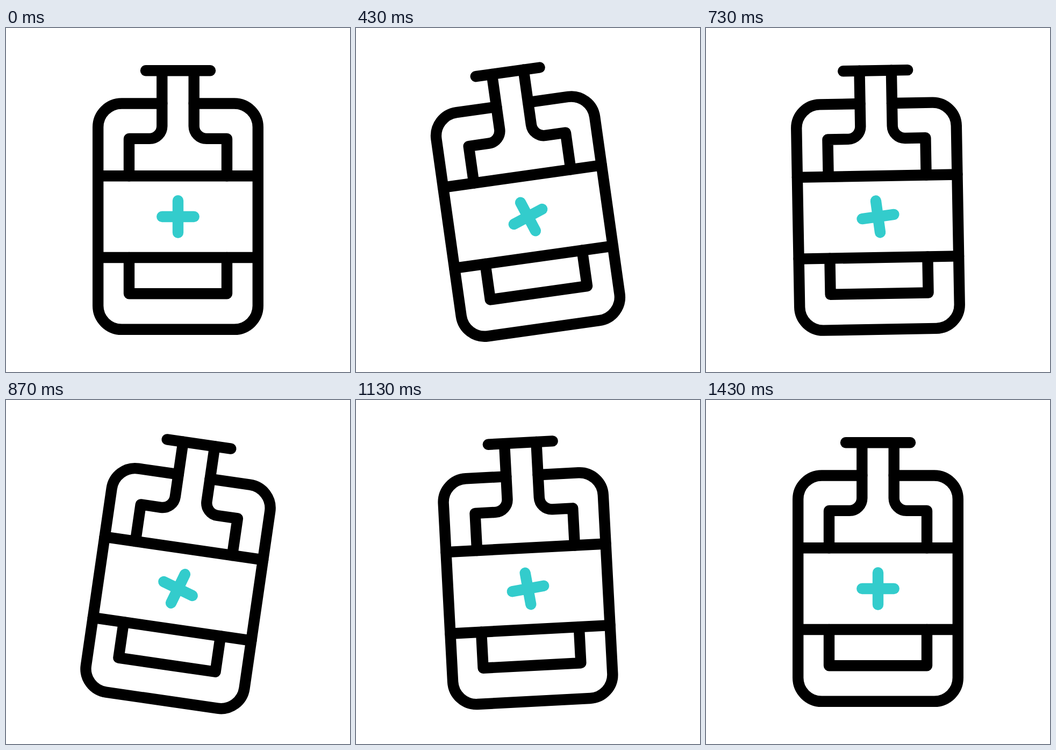
Write an HTML page that moves like this. It is 640 by 640 pixels and loops after 1.67 s.

```html
<!DOCTYPE html>
<html lang="en">
<head>
<meta charset="utf-8">
<title>Medicine bottle</title>
<style>
  html, body { margin: 0; width: 100%; height: 100%; overflow: hidden; background: #fff; }
  svg { display: block; width: 100%; height: 100%; }
  g { fill: none; stroke-width: 20.4; stroke-linecap: round; stroke-linejoin: round; }
</style>
</head>
<body>
<svg viewBox="0 0 640 640">
  <g id="bottle" stroke="#000">
    <path d="M260 79.2H380"/>
    <path d="M290.3 140.5H215.2A44 44 0 0 0 171.2 184.5V516.8A44 44 0 0 0 215.2 560.8H424.8A44 44 0 0 0 468.8 516.8V184.5A44 44 0 0 0 424.8 140.5H349.7"/>
    <path d="M290.3 79.2V182.5A23.4 23.4 0 0 1 266.9 205.9H229V275.2"/>
    <path d="M349.7 79.2V182.5A23.4 23.4 0 0 0 373.1 205.9H411V275.2"/>
    <path d="M171.2 275.2H468.8M171.2 427H468.8"/>
    <path d="M229 427V494.2H411V427"/>
    <path id="cross" stroke="#33cccc" d="M290.3 351H349.7M320 321.3V380.7"/>
  </g>
</svg>
<script>
  const LOOP = 1670, FPS = 30;
  const bottle = document.getElementById('bottle');
  const cross = document.getElementById('cross');

  // [step, degrees]: damped swings; the cross turns relative to the bottle
  const bottleKeys = [[8, 0], [18, -16], [25, 8.5], [36, -4], [42.6, 0]];
  const crossKeys = [[8, 0], [18.4, -42.6], [25, 20], [31, -14.7], [37, 0]];

  function swing(keys, step) {
    if (step <= keys[0][0]) return keys[0][1];
    for (let i = 1; i < keys.length; i++) {
      const [a, from] = keys[i - 1], [b, to] = keys[i];
      if (step < b) {
        const p = (step - a) / (b - a);
        return from + (to - from) * (1 - Math.cos(Math.PI * p)) / 2;
      }
    }
    return keys[keys.length - 1][1];
  }

  function turn(el, deg) {
    el.setAttribute('transform', `rotate(${deg.toFixed(3)} 320 351)`);
  }

  function draw(ms) {
    const step = Math.floor((ms % LOOP + 4) * FPS / 1000);
    turn(bottle, swing(bottleKeys, step));
    turn(cross, swing(crossKeys, step));
  }

  const start = performance.now();
  function tick(now) {
    draw(Math.max(0, now - start));
    requestAnimationFrame(tick);
  }
  draw(0);
  requestAnimationFrame(tick);
</script>
</body>
</html>
```
